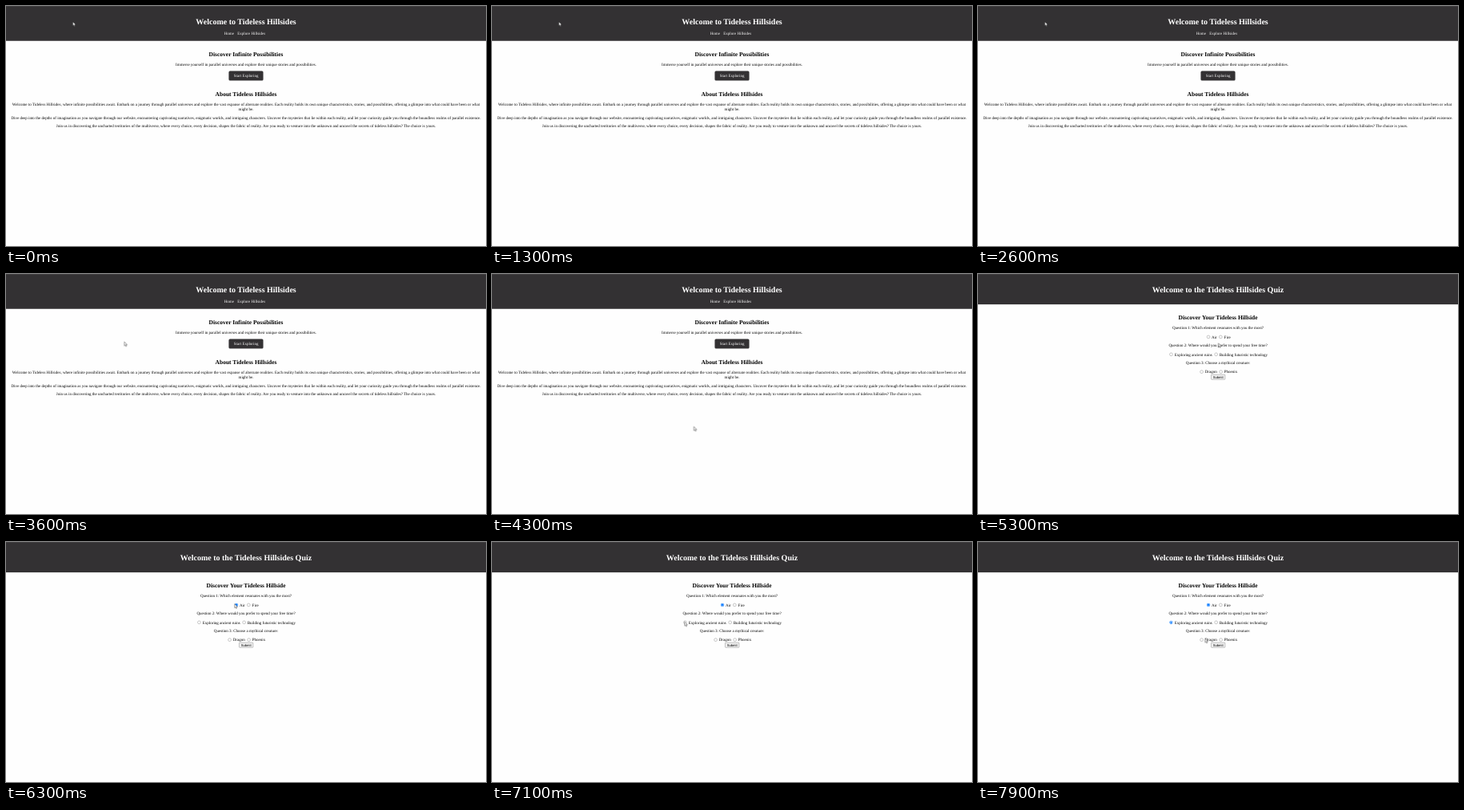
Recreate the animation shown at these times as an HTML page. Size 600x301 px, loop 8000 ms.

```html
<!DOCTYPE html>
<html lang="en">
<head>
<meta charset="utf-8">
<title>Tideless Hillsides</title>
<style>
  html, body { margin: 0; width: 100%; height: 100%; overflow: hidden; background: #fefefe; }

  /* A 1920px wide desktop page, shown at 600px */
  .screen {
    position: absolute; left: 0; top: 0; width: 1920px; height: 964px; overflow: hidden;
    transform: scale(.3125); transform-origin: 0 0;
    font: 16px/18px "Liberation Serif", "Times New Roman", serif;
    color: #000; text-align: center; white-space: nowrap;
    text-rendering: geometricPrecision;
  }
  .page { position: absolute; inset: 0; background: #fefefe; }
  header { display: flow-root; padding: 20px 0; border-top: 2px solid #4a484a;
    background: #333133; color: #fff; }
  h1 { margin: 21.44px 0; font-size: 32px; line-height: 37px; }
  h2 { margin: 19.92px 0; font-size: 24px; line-height: 27px; }
  p { margin: 16px 0; }
  main { display: flow-root; padding-top: 20px; }
  nav span { margin-right: 10px; }
  .start { display: block; width: max-content; margin: 0 auto 42px; padding: 10px 20px;
    border-radius: 5px; background: #333133; color: #fff; }

  /* An invisible skew switches off glyph hinting, so small text keeps its shape */
  h1, h2, p, nav, .start, .row, .submit { transform: skewX(.12deg); }

  .row { height: 20px; line-height: 20px; }
  .row i { display: inline-block; box-sizing: border-box; width: 13px; height: 13px;
    margin: 3px 3px 0 5px; vertical-align: -1px;
    border: 1px solid #555; border-radius: 50%; background: #fff; }
  .submit { width: 57px; height: 21px; box-sizing: border-box; margin: 0 auto;
    border: 1px solid #555; border-radius: 3px; background: #efefef;
    font: 13.333px/19px "Liberation Sans", Arial, sans-serif; }

  .cursor { position: absolute; left: 0; top: 0; width: 13px; height: 20px; overflow: visible;
    animation: travel 8s infinite; }

  .home { animation: leave 8s step-end infinite; }
  .row .air { animation: pick-air 8s step-end infinite; }
  .row .ruins { animation: pick-ruins 8s step-end infinite; }

  @keyframes leave { 0% { visibility: visible } 66.2%, 100% { visibility: hidden } }
  @keyframes pick-air {
    77.4%, 100% { border-color: #0075ff; background: #0075ff; box-shadow: inset 0 0 0 2px #fff }
  }
  @keyframes pick-ruins {
    89.9%, 100% { border-color: #0075ff; background: #0075ff; box-shadow: inset 0 0 0 2px #fff }
  }
  @keyframes travel {
    0% { transform: translate(267px, 63px); animation-timing-function: step-end }
    37.5% { transform: translate(267px, 63px); animation-timing-function: steps(9) }
    48.75% { transform: translate(576px, 376px); animation-timing-function: steps(4) }
    53.75% { transform: translate(807px, 612px); animation-timing-function: steps(1) }
    55% { transform: translate(822px, 622px); animation-timing-function: steps(4) }
    60% { transform: translate(925px, 360px); animation-timing-function: steps(3) }
    63.75% { transform: translate(961px, 277px); animation-timing-function: step-end }
    71.25% { transform: translate(961px, 277px); animation-timing-function: steps(5) }
    77.5% { transform: translate(914px, 248px); animation-timing-function: step-end }
    80% { transform: translate(914px, 248px); animation-timing-function: steps(2) }
    82.5% { transform: translate(888px, 278px); animation-timing-function: steps(5) }
    88.75% { transform: translate(770px, 320px); animation-timing-function: step-end }
    93.75% { transform: translate(770px, 320px); animation-timing-function: steps(4) }
    98.75%, 100% { transform: translate(908px, 387px) }
  }
</style>
</head>
<body>
<div class="screen">
  <section class="page">
    <header><h1>Welcome to the Tideless Hillsides Quiz</h1></header>
    <main>
      <h2>Discover Your Tideless Hillside</h2>
      <p>Question 1: Which element resonates with you the most?</p>
      <div class="row"><i class="air"></i> Air <i></i> Fire</div>
      <p>Question 2: Where would you prefer to spend your free time?</p>
      <div class="row"><i class="ruins"></i> Exploring ancient ruins <i></i> Building futuristic technology</div>
      <p>Question 3: Choose a mythical creature:</p>
      <div class="row"><i></i> Dragon <i></i> Phoenix</div>
      <div class="submit">Submit</div>
    </main>
  </section>

  <section class="page home">
    <header>
      <h1>Welcome to Tideless Hillsides</h1>
      <nav><span>Home</span> <span>Explore Hillsides</span></nav>
    </header>
    <main>
      <h2>Discover Infinite Possibilities</h2>
      <p>Immerse yourself in parallel universes and explore their unique stories and possibilities.</p>
      <div class="start">Start Exploring</div>
      <h2>About Tideless Hillsides</h2>
      <p>Welcome to Tideless Hillsides, where infinite possibilities await. Embark on a journey through parallel universes and explore the vast expanse of alternate realities. Each reality holds its own unique characteristics, stories, and possibilities, offering a glimpse into what could have been or what<br>might be.</p>
      <p>Dive deep into the depths of imagination as you navigate through our website, encountering captivating narratives, enigmatic worlds, and intriguing characters. Uncover the mysteries that lie within each reality, and let your curiosity guide you through the boundless realms of parallel existence.</p>
      <p>Join us in discovering the uncharted territories of the multiverse, where every choice, every decision, shapes the fabric of reality. Are you ready to venture into the unknown and unravel the secrets of tideless hillsides? The choice is yours.</p>
    </main>
  </section>

  <svg class="cursor" viewBox="0 0 13 20">
    <path d="M.5 .5V16.5L4.2 13L6.6 18.8L9.2 17.7L6.8 12H12Z" fill="#fff" stroke="#000" stroke-width="1.2"/>
  </svg>
</div>
</body>
</html>
```
